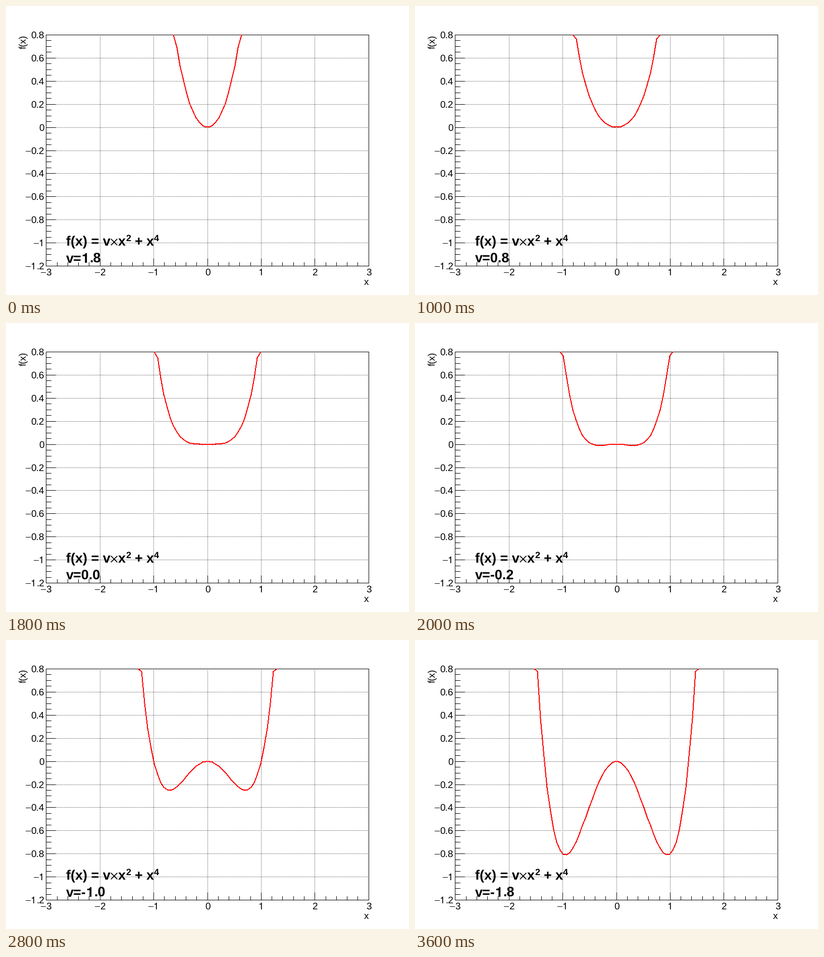
These frames come from a looping animation (798 px wide and 574 px high, 3900 ms). A matplotlib script:

```python
import math

import matplotlib.pyplot as plt
import numpy as np
from matplotlib.animation import FuncAnimation
from matplotlib.patches import Polygon

W, H, DPI = 798, 574, 64
PT = 72 / DPI                       # points per pixel
LEFT, RIGHT, TOP, BOTTOM = 0.1 * W, 0.9 * W, 0.1 * H, 0.9 * H
XMIN, XMAX, YMIN, YMAX = -3, 3, -1.2, 0.8
SMALL, BIG, SUP = 19, 27, 18        # text sizes in pixels
STEPS = 19

# Footless digit one, in em units
ONE = {
    "normal": [(.259, 0), (.259, .505), (.102, .505), (.102, .568),
               (.19, .588), (.25, .63), (.289, .709), (.347, .709), (.347, 0)],
    "bold": [(.238, 0), (.238, .484), (.069, .484), (.069, .587),
             (.17, .595), (.25, .635), (.276, .71), (.378, .71), (.378, 0)],
}
ADVANCE = {".": 0.278, "=": 0.584, "-": 0.333}

plt.rcParams["text.hinting"] = "none"

fig = plt.figure(figsize=(W / DPI, H / DPI), dpi=DPI, facecolor="white")
ax = fig.add_axes([0, 0, 1, 1])
ax.set_xlim(0, W)
ax.set_ylim(H, 0)
ax.axis("off")


def px(x):
    return np.floor(LEFT + (x - XMIN) / (XMAX - XMIN) * (RIGHT - LEFT) + 1e-6)


def py(y):
    return np.floor(TOP + (YMAX - y) / (YMAX - YMIN) * (BOTTOM - TOP) + 1e-6)


def line(xs, ys, lw=1, **kw):
    ax.plot(xs, ys, color="black", lw=lw * PT, snap=False,
            solid_capstyle="butt", dash_capstyle="butt", **kw)


def hline(x0, x1, y, **kw):
    line([x0, x1], [y + 0.5, y + 0.5], **kw)


def vline(x, y0, y1, **kw):
    line([x + 0.5, x + 0.5], [y0, y1], **kw)


def text(x, y, s, size=SMALL, weight="normal", **kw):
    return ax.text(x, y, s, fontsize=size * PT, family="Liberation Sans",
                   weight=weight, ha="left", va="baseline", color="black",
                   zorder=5, **kw)


def width(s, size):
    return size * sum(ADVANCE.get(c, 0.556) for c in s)


def write(x, y, s, size=SMALL, weight="normal"):
    """Place a string, drawing each digit one as a shape."""
    artists = []
    for i, part in enumerate(s.split("1")):
        if i:
            pts = [(round(x) + size * u, y - size * v) for u, v in ONE[weight]]
            artists.append(ax.add_patch(Polygon(pts, fc="black", lw=0,
                                                zorder=5)))
            x += width("1", size)
        if part:
            artists.append(text(x, y, part, size, weight))
            x += width(part, size)
    return artists


def number(value, baseline, right=None, center=None):
    s = f"{abs(value):g}"
    digits = width(s, SMALL)
    minus = 0.549 * SMALL if value < 0 else 0
    if right is None:
        right = center + (digits + minus) / 2
    write(right - digits, baseline, s)
    if minus:
        x = round(right - digits - minus)
        hline(x, x + 10, baseline - 6)


# Grid
dots = dict(linestyle=(0, (1, 2)), zorder=1)
for i in range(1, 6):
    vline(px(XMIN + i), BOTTOM // 1 + 1, TOP // 1, **dots)
for i in range(1, 10):
    hline(LEFT // 1, RIGHT // 1 + 1, py(YMAX - 0.2 * i), **dots)

# Frame
x0, x1, y0, y1 = (math.floor(v) for v in (LEFT, RIGHT, TOP, BOTTOM))
for y in (y0, y1):
    hline(x0, x1 + 1, y)
for x in (x0, x1):
    vline(x, y0, y1 + 1)

# Ticks and labels
for i in range(31):
    vline(px(XMIN + 0.2 * i), y1 - (7 if i % 5 else 14), y1)
for i in range(41):
    hline(x0, x0 + (11 if i % 4 else 20), py(YMAX - 0.05 * i))
for n in range(-3, 4):
    number(n, 535, center=px(n) + 0.5)
for i in range(11):
    value = round(YMAX - 0.2 * i, 1)
    number(value, py(value) + 7, right=75.8)

# Axis titles
text(708.5, 554, "x")
text(40, 84.8, "f(x)", rotation=90, rotation_mode="anchor")

# Formula
bold = dict(size=BIG, weight="bold")
sup = dict(size=SUP, weight="bold")
text(119, 476, "f(x) = v", **bold)
for ya, yb in ((462.6, 475.2), (475.2, 462.6)):
    line([207.8, 220.4], [ya, yb], lw=1.7, zorder=5)
text(222, 476, "x", **bold)
text(237, 467, "2", **sup)
text(255, 476, "+", **bold)
text(278, 476, "x", **bold)
text(293, 467, "4", **sup)

rows, cols = np.mgrid[:H, :W]
xs = np.linspace(-2.97, 2.97, 100)
canvas = np.zeros((H, W, 4), np.uint8)
canvas[..., 0] = 255
curve = fig.figimage(canvas, origin="upper", zorder=3)
label = []


def stroke(pts, radius=1):
    """Mask of the pixels whose centres lie under a polyline."""
    mask = np.zeros((H, W), bool)
    for (xa, ya), (xb, yb) in zip(pts, pts[1:]):
        win = (slice(int(min(ya, yb)) - 2, int(max(ya, yb)) + 3),
               slice(int(min(xa, xb)) - 2, int(max(xa, xb)) + 3))
        size = math.hypot(xb - xa, yb - ya)
        ux, uy = (xb - xa) / size, (yb - ya) / size
        # the small shift settles ties to the upper left
        dx, dy = cols[win] - xa + 0.01, rows[win] - ya + 0.01
        along, across = dx * ux + dy * uy, dx * uy - dy * ux
        mask[win] |= ((abs(across) <= radius) & (along >= -0.25)
                      & (along <= size + 0.25))
    return mask


def draw(i):
    v = (9 - min(i // 2, STEPS - 1)) / 5
    ys = v * xs**2 + xs**4
    inside = np.flatnonzero(ys < YMAX)
    part = slice(inside[0] - 1, inside[-1] + 2)
    pts = list(zip(px(xs[part]), py(np.minimum(ys[part], YMAX))))
    canvas[..., 3] = 255 * stroke(pts)
    curve.set_data(canvas.copy())
    for artist in label:
        artist.remove()
    label[:] = write(119, 510, f"v={v:.1f}", **bold)
    return [curve, *label]


anim = FuncAnimation(fig, draw, frames=39, interval=100, repeat=True,
                     repeat_delay=0, blit=False)
plt.show()
```
